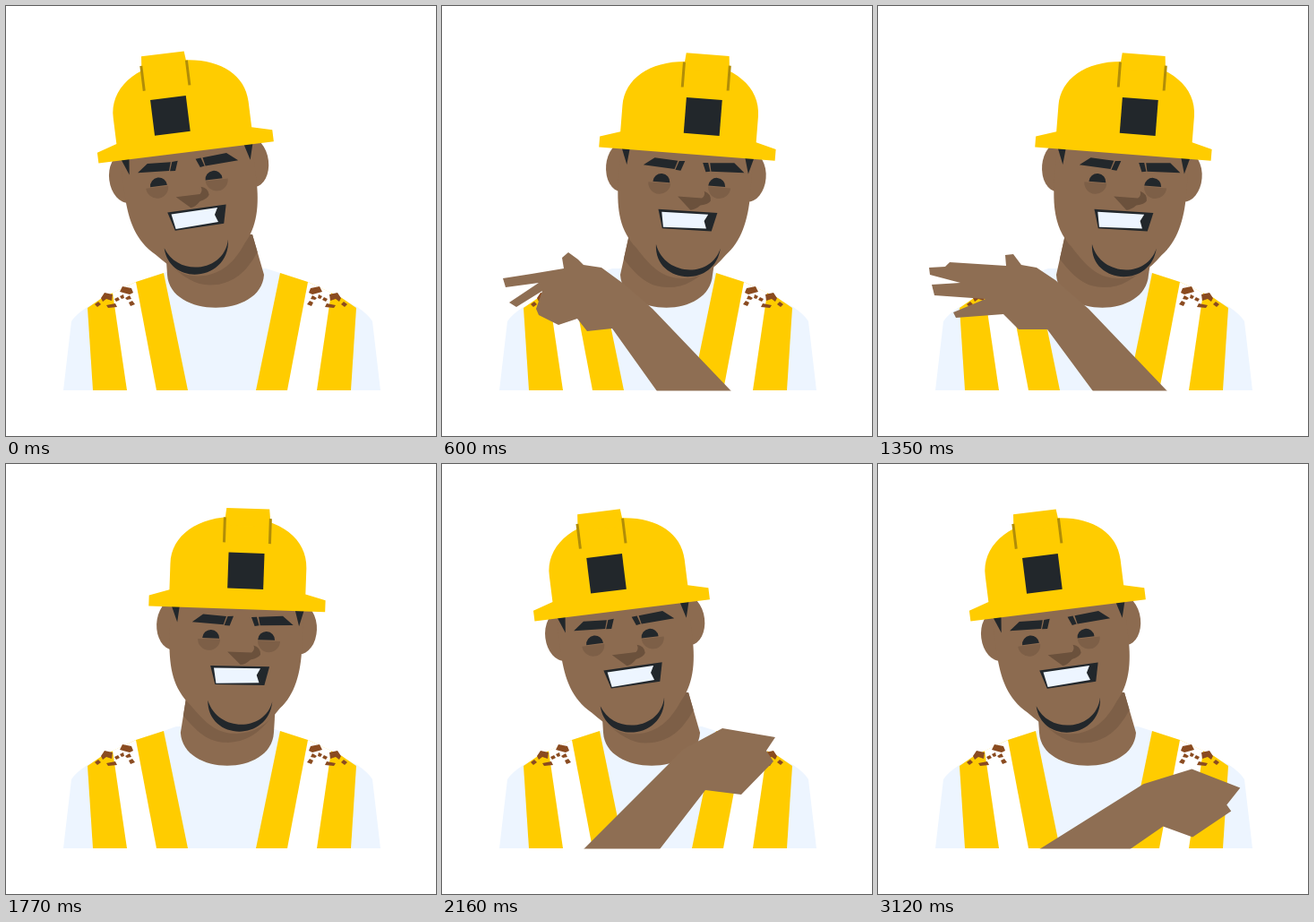
Recreate the animation shown at these times as an HTML page. Size 480 by 480 pixels, loop 3.15 s.

```html
<!DOCTYPE html>
<html lang="en">
<head>
<meta charset="utf-8">
<title>Brush it off</title>
<style>
html, body { margin: 0; width: 100%; height: 100%; overflow: hidden; background: #fff; }
svg { display: block; width: 100vw; height: 100vh; }
.yellow { fill: #ffcc00; }
.dark { fill: #22272b; }
.skin { fill: #8c6b50; }
.shade { fill: #7d5f47; }
.light { fill: #edf5ff; }
.dirt { fill: #8a4b20; }
</style>
</head>
<body>
<svg viewBox="0 0 480 480">
  <defs>
    <path id="face" d="M-74,0 V40 C-73,70 -68,92 -48,110 C-30,130 -18,140 2,140 C22,140 38,130 52,110 C68,94 74,70 74,40 V0Z"/>
    <clipPath id="neckClip"><path id="neckClipShape"/></clipPath>
    <clipPath id="floor"><rect width="480" height="429.5"/></clipPath>
    <g id="strap">
      <path class="yellow" d="M91,337 L107,326 L145,308 L176,298 L203,429 H97Z"/>
      <path fill="#fff" d="M119,320 L145,308 L168,429 H135Z"/>
    </g>
    <g id="dirt" class="dirt">
      <path d="M106,326 L110,320 L119,322 L118,329 L112,327 L108,330Z"/>
      <path d="M127,319 L130,313 L140,315 L142,320 L138,322Z"/>
      <path d="M112,334 L122,332 L124,336 L114,337Z"/>
      <path d="M99,333 L103,330 L106,333 L102,336Z"/>
      <path d="M121,327 L125,325 L127,328 L123,330Z"/>
      <path d="M127,324 L131,322 L132,326 L129,327Z"/>
      <path d="M133,326 L138,323 L140,327 L135,328Z"/>
      <path d="M137,331 L141,329 L144,333 L139,335Z"/>
    </g>
  </defs>

  <g id="body">
    <path class="light" d="M64,429 L73,352 Q78,344 91,336 L145,308 L176,298 L190,293 H290 L306,298 L335,308 L392,336 Q404,344 409,352 L418,429Z"/>
    <use href="#strap"/>
    <use href="#strap" transform="matrix(-1 0 0 1 482 0)"/>
    <use href="#dirt"/>
    <use href="#dirt" transform="matrix(-1 0 0 1 480 0)"/>
  </g>

  <path id="neck" class="skin"/>
  <g clip-path="url(#neckClip)"><use id="chinShade" href="#face" class="shade"/></g>

  <g id="head">
    <g class="skin">
      <ellipse cx="-70" cy="21" rx="19" ry="28"/>
      <ellipse cx="71" cy="21" rx="19" ry="28"/>
      <use href="#face"/>
    </g>
    <path class="dark" d="M-73,0 H-64 L-66,18Z M65,0 H75 L70,18Z"/>
    <g id="eyes">
      <path class="shade" d="M-45,35.5 H-20 A12.5,12.5 0 0 1 -45,35.5Z M22,35.5 H47 A12.5,12.5 0 0 1 22,35.5Z"/>
      <path class="dark" d="M-40,34.5 A9.5,9.5 0 0 1 -21,34.5Z M22,34.5 A9.5,9.5 0 0 1 41,34.5Z"/>
      <path class="dark" d="M-52,17 L-40,8 L-14,9.5 L-17,19Z M-12.5,9.5 L-6,9 L-10,20 L-16,19.5Z M14,9.5 L20,9 L23,18.5 L18,19.5Z M22,9 L49,7 L61,17 L24,18.5Z"/>
    </g>
    <path id="nose" fill="#6b513c" d="M-12,49 H15 Q19,46 17,41 Q25,43 25,51 Q23,55 14,57 Q8,63 3,63Z"/>
    <g id="mouth">
      <path class="dark" d="M-28,65 L38,64 L33,85 L-22,86Z"/>
      <path class="light" d="M-24,67.5 L28,66.5 L24,74 L27,82.5 L-21,84.5Z"/>
    </g>
    <path id="beard" class="dark" d="M-32,104 C-31,149 37,149 40,103 C32,138 -20,139 -32,104Z"/>
    <path class="yellow" d="M-98.5,1 V-11 L-76,-18 V-47 C-76,-80 -45,-102 0,-102 C45,-102 76,-80 76,-47 V-18 L98.5,-12 V1Z"/>
    <g id="front">
      <path class="yellow" d="M-24,-111.5 H24 L26,-92 H-26Z"/>
      <path stroke="#b18d08" stroke-width="3" d="M-25.5,-101 V-73 M25.5,-101 V-73"/>
      <rect class="dark" x="-20" y="-62" width="40" height="40"/>
    </g>
  </g>

  <g clip-path="url(#floor)">
    <path id="armLeft" fill="#8e6e53"/>
    <path id="armRight" fill="#8e6e53" transform="matrix(-1 0 0 1 480 0)"/>
  </g>
  <path id="crumbsLeft" class="dirt"/>
  <path id="crumbsRight" class="dirt" transform="matrix(-1 0 0 1 480 0)"/>
</svg>
<script>
const LOOP = 3150;
const SIDE_DELAY = 1620;
const $ = id => document.getElementById(id);
const clamp = x => Math.min(1, Math.max(0, x));
const mix = (a, b, k) => a + (b - a) * k;
const points = text => text.split(' ').map(p => p.split(',').map(Number));

// Arm outlines, drawn for the left shoulder.
const low = points('265,430 205,400 145,390 94,420 105,430 105,440 129,460 162,460 199,460');
const half = points('300,430 184,357 130,340 76,361 91,380 86,387 129,416 162,404 199,430');
const fist = points('322,430 210,318 167,295 108,305 118,320 110,332 146,369 186,364 237,430');
const spread = points('323,430 235,338 204,311 178,292 158,289 152,283 141,275 134,281 136,293 100,299 68,304 71,314 ' +
  '108,309 75,331 83,336 112,318 105,338 108,345 130,356 151,349 162,363 190,360 240,430');
const swept = points('323,430 235,338 198,306 177,292 160,289 151,277 142,278 143,290 80,286 75,291 57,292 58,300 ' +
  '92,309 60,311 63,323 120,327 84,342 87,348 140,344 148,352 157,361 189,361 240,430');

const outline = (a, b, k, dy = 0) =>
  'M' + a.map(([x, y], i) => [mix(x, b[i][0], k), mix(y, b[i][1], k) + dy]).join('L') + 'Z';

// Cubic bezier (.25, 0, .4, 1).
function ease(x) {
  x = clamp(x);
  let lo = 0, hi = 1;
  for (let i = 0; i < 24; i++) {
    const s = (lo + hi) / 2, r = 1 - s;
    if (.75 * r * r * s + 1.2 * r * s * s + s ** 3 < x) lo = s; else hi = s;
  }
  return lo * lo * (3 - 2 * lo);
}

function armPath(t, leave, brushEnd) {
  if (t < 210 || t >= leave + 135) return '';
  if (t < 270) return outline(low, low, 0, (270 - t) * .75);
  if (t < 570) return outline(low, fist, Math.sin(clamp((t - 270) / 270) * Math.PI / 2));
  if (t >= leave) return outline(fist, half, (t - leave) / 105);
  const brush = Math.max(0, Math.min(t, brushEnd) - 600);
  return outline(spread, swept, .5 - .5 * Math.cos(brush / 300 * 2 * Math.PI));
}

function crumbsPath(t) {
  if (t < 640 || t > 1100) return '';
  let d = '';
  for (let i = 0; i < 5; i++) {
    const age = (t - 640 - i * 25) / 1000;
    if (age < 0) continue;
    const x = 98 - i * 4 - (300 + i * 35) * age;
    const y = 318 - (420 + i * 60) * age + 750 * age * age;
    const r = 3 + i % 3;
    d += `M${x - r},${y}l${r},${-r}l${r},${r * .7}l${-r * .8},${r}Z`;
  }
  return d;
}

function drawHead(lean) {
  const side = lean - .5;
  const pose = `translate(${201 + 72.5 * lean} ${159 + 17 * (lean - .45) ** 2}) rotate(${-7.1 + 11.6 * lean})`;
  const slide = (id, x) => $(id).setAttribute('transform', `translate(${x} 0)`);
  $('head').setAttribute('transform', pose);
  $('chinShade').setAttribute('transform', `translate(${14 - 30 * lean} 10) ${pose}`);
  slide('front', 1 + 27 * side);
  slide('eyes', 9 * side);
  slide('nose', 11 * side);
  slide('mouth', 2 * side);
  slide('beard', 11 * side);

  const left = 180 + 19 * lean, right = 288 + 14 * lean;
  const neck = `M${177 + 32 * lean},255 L${left},300 C${left + 3},349 ${right - 3},349 ${right},300 L${275 + 34 * lean},255Z`;
  $('neck').setAttribute('d', neck);
  $('neckClipShape').setAttribute('d', neck);
}

function draw(t) {
  drawHead(ease((t - 75) / 520) - ease((t - 1660) / 520));
  const mirrored = t - SIDE_DELAY;
  $('armLeft').setAttribute('d', armPath(t, 1545, 1545));
  $('armRight').setAttribute('d', armPath(mirrored, 1395, 1050));
  $('crumbsLeft').setAttribute('d', crumbsPath(t));
  $('crumbsRight').setAttribute('d', crumbsPath(mirrored));
}

const start = performance.now();
function tick() {
  draw((performance.now() - start) % LOOP);
  requestAnimationFrame(tick);
}
tick();
</script>
</body>
</html>
```
